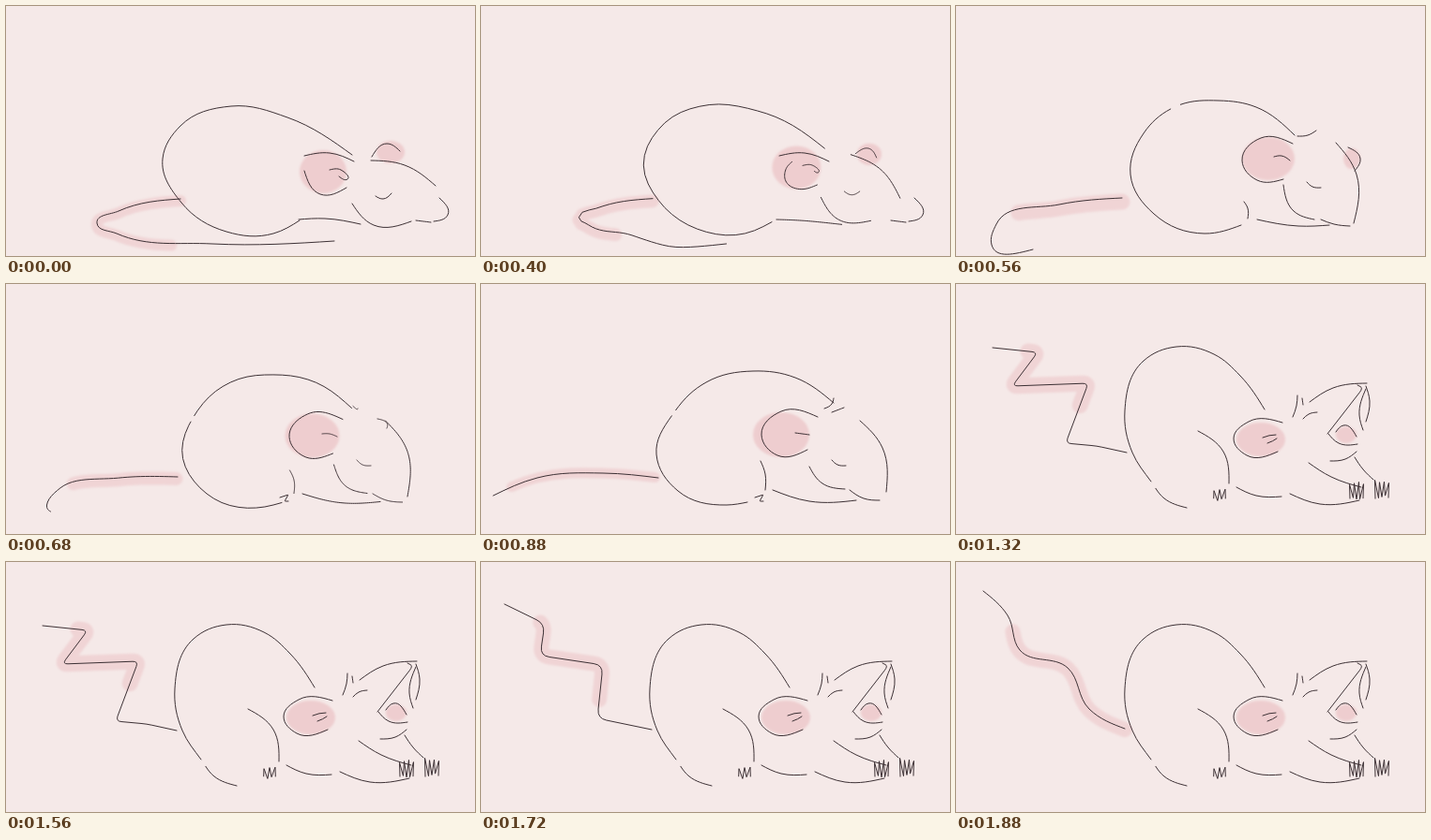
Write an HTML page that moves like this. It is 500 px wide and 267 px high and loops after 2.08 s.

```html
<!DOCTYPE html>
<html lang="en">
<head>
<meta charset="utf-8">
<title>Stretching rat</title>
<style>
  html, body { margin: 0; width: 100%; height: 100%; overflow: hidden; background: #f5e9e8; }
  svg { display: block; width: 100vw; height: 100vh; }
  .pose { visibility: hidden; }
  .pose.on { visibility: visible; }
  path { fill: none; stroke-linecap: round; stroke-linejoin: round; }
  .line { stroke: #3c3034; stroke-width: 1; }
  .tint { stroke: #f0d4d5; }
  .wash { fill: #eecdcf; }
  .soft { filter: url(#soft); }
</style>
</head>
<body>
<svg id="stage" viewBox="0 0 500 267" preserveAspectRatio="none">
  <filter id="soft" filterUnits="userSpaceOnUse" x="-20" y="-20" width="540" height="310">
    <feGaussianBlur stdDeviation="1"/>
  </filter>
</svg>
<script>
const LOOP = 2080;
const NS = 'http://www.w3.org/2000/svg';
const stage = document.getElementById('stage');

const mix = (a, b, t) => a + (b - a) * t;
const mixAll = (a, b, t) => a.map((v, i) => mix(v, b[i], t));
const dist = (a, b) => Math.hypot(b[0] - a[0], b[1] - a[1]);
const toward = (a, b, d) => mixAll(a, b, Math.min(0.5, d / dist(a, b)));

// Direction of the circle through three points, at the middle one.
function heading(a, b, c) {
  const u = dist(a, b) ** 2, v = dist(b, c) ** 2;
  const d = b.map((m, k) => (m - a[k]) / u + (c[k] - m) / v);
  const n = Math.hypot(...d);
  return d.map(x => x / n);
}

function smooth(p) {
  const dir = p.map((b, i) => i && p[i + 1] ? heading(p[i - 1], b, p[i + 1]) : null);
  let d = 'M' + p[0];
  for (let i = 0; i < p.length - 1; i++) {
    const b = p[i], c = p[i + 1], h = dist(b, c) * 0.36;
    const out = dir[i] && b.map((v, k) => v + dir[i][k] * h);
    const back = dir[i + 1] && c.map((v, k) => v - dir[i + 1][k] * h);
    const c1 = out || mixAll(b, back || c, 0.5);
    const c2 = back || mixAll(c, c1, 0.5);
    d += `C${c1} ${c2} ${c}`;
  }
  return d;
}

function bent(p, radius) {
  let d = 'M' + p[0];
  for (let i = 1; i < p.length - 1; i++)
    d += `L${toward(p[i], p[i - 1], radius)}Q${p[i]} ${toward(p[i], p[i + 1], radius)}`;
  return d + 'L' + p.at(-1);
}

const points = text => text.split(' ').map(s => s.split(',').map(Number));
const curve = text => smooth(points(text));
const zigzag = (text, radius = 6) => bent(points(text), radius);

const noise = n => Math.abs(Math.sin(n * 127.1) * 43758.5) % 1;

// A scribbled paw: a fan of pointed toes along a baseline.
function claws(x, y, width, height, toes, seed) {
  const p = [];
  for (let i = 0; i <= toes * 2; i++) {
    const side = i / toes - 1;
    const lift = i % 2 ? height * (0.7 + 0.3 * noise(seed + i)) : 4 * noise(seed + i);
    p.push([x + side * width * (i % 2 ? 0.5 : 0.35), y - lift]);
  }
  return bent(p, 0.5);
}

// Two short parallel folds inside the ear.
const folds = (x, y) => `M${x},${y}q7,-3 14,-3m-9,9q6,-2 10,-5`;

// Lines go through a few key points. Gap is [start, length] along the back, in percent.
// Tint follows the tail: start, end in percent, width, drop. Washes: cx, cy, rx, ry.
const sleep = {
  gap: [100, 0],
  tint: [0, 51, 12, 2],
  wash: { ear: [338, 177, 25, 23], far: [410, 156, 15, 12] },
  lines: {
    tail: curve('186,206 120,219 97,232 118,243 220,254 350,251'),
    back: curve('369,159 300,119 240,107 186,128 167,163 187,210 235,241 285,243 313,229'),
    under: curve('312,228 340,227 378,233'),
    earTop: curve('371,166 345,157 318,160'),
    ear: curve('318,176 335,201 363,194'),
    folds: curve('345,175 357,175 364,185 355,182'),
    far: curve('390,161 406,147 420,155'),
    brow: curve('389,165 425,170 458,192'),
    nose: curve('462,205 471,223 456,230'),
    lip: curve('437,229 453,231'),
    cheek: curve('369,211 392,234 432,230'),
    eye: curve('394,203 402,206 411,200')
  }
};

const wake = {
  gap: [35, 3],
  tint: [0, 52, 17, 4],
  wash: { ear: [333, 163, 28, 23], far: [422, 163, 9, 11] },
  lines: {
    tail: curve('177,205 110,212 43,233 38,255 82,260'),
    back: curve('361,138 320,108 280,101 235,107 200,136 186,180 211,222 265,243 304,234'),
    thigh: curve('307,209 311,216 311,227'),
    under: curve('321,228 365,235 398,234'),
    ear: curve('359,147 325,141 305,165 321,186 349,185'),
    folds: curve('339,161 347,160 356,165'),
    nape: curve('364,139 375,138 384,133'),
    far: curve('418,151 431,163 425,176'),
    brow: curve('405,146 427,180 424,232'),
    cheek: curve('349,191 360,219 382,228'),
    chin: curve('389,228 403,233 420,235'),
    eye: curve('374,188 380,193 389,194')
  }
};

const rise = {
  gap: [52, 2],
  tint: [2, 88, 11, 0],
  wash: { ear: [320, 161, 30, 24] },
  lines: {
    tail: curve('189,207 130,202 60,207 13,226'),
    back: curve('376,127 335,100 290,93 240,105 206,137 187,182 210,221 262,236 284,233'),
    thigh: curve('298,189 303,203 303,220'),
    foot: zigzag('292,228 301,225 297,232 301,232', 1),
    under: curve('311,220 350,232 400,231'),
    ear: curve('359,142 320,136 299,161 316,183 348,177'),
    folds: curve('335,159 350,161'),
    nape: curve('376,122 374,128 366,133'),
    far: curve('374,137 387,132'),
    brow: curve('404,146 428,175 432,222'),
    cheek: curve('350,195 364,213 388,219'),
    chin: curve('393,220 408,229 425,231'),
    eye: wake.lines.eye
  }
};

const reach = {
  gap: [100, 0],
  tint: [4, 90, 13, -1],
  wash: { ear: [320, 168, 31, 22] },
  lines: {
    tail: curve('191,198 130,189 65,176 30,152 0,134'),
    back: curve('325,123 290,99 240,78 200,95 183,140 195,197 218,221 255,234 294,218'),
    thigh: curve('270,160 288,184 294,215'),
    foot: zigzag('278,230 291,225 286,230 290,230', 1),
    under: curve('295,216 325,226 365,229'),
    chin: curve('362,228 390,234 440,232'),
    arm: curve('396,202 416,215 440,233'),
    arm2: zigzag('430,199 455,228 460,228 435,228', 1),
    ear: curve('344,143 310,144 295,168 318,187 350,175'),
    folds: folds(327, 164),
    far: zigzag('352,138 364,119 368,124', 1),
    brow: curve('379,128 402,114 432,109'),
    mouth: zigzag('431,122 418,140 431,141 434,124', 2),
    lip: curve('438,118 439,135 438,152'),
    jaw: curve('437,163 434,176 422,187'),
    cheek: curve('355,182 363,194 379,197'),
    eye: curve('368,147 376,144 386,146')
  }
};

const yawn = {
  gap: [86, 2.5],
  tint: [36, 87, 17, 0],
  wash: { ear: [325, 166, 26, 18], tongue: [416, 161, 11, 9] },
  lines: {
    ...reach.lines,
    tail: zigzag('182,180 150,173 117,170 141,106 60,109 87,73 39,68'),
    back: curve('329,134 303,98 275,75 235,67 200,82 180,135 188,180 208,211 222,229 246,239'),
    thigh: curve('258,157 285,179 291,213'),
    foot: claws(281, 232, 18, 15, 3, 2),
    under: curve('299,217 320,226 347,227'),
    chin: curve('356,224 388,235 430,231'),
    arm: curve('376,191 400,206 432,217'),
    arm2: curve('425,185 434,198 445,209'),
    ear: curve('348,148 312,147 296,165 310,183 343,179'),
    far: curve('364,119 363,130 359,142'),
    far2: curve('369,122 370,129'),
    brow: curve('377,126 402,111 438,106'),
    snout: zigzag('428,108 434,111 396,160'),
    mouth: curve('397,160 408,170 428,171'),
    tongue: curve('405,158 413,151 427,163'),
    lip: curve('437,109 441,125 437,147'),
    teeth: curve('437,112 430,140 434,156'),
    jaw: curve('427,179 415,187 399,189'),
    cheek: '',
    paw: claws(427, 231, 20, 20, 4, 5),
    paw2: claws(454, 230, 20, 21, 4, 9),
    eye: curve('370,144 376,139 385,137')
  }
};

const withTail = (tail, tint) => ({ ...yawn, tint, lines: { ...yawn.lines, tail } });
const flick = withTail(zigzag('182,179 124,167 130,110 63,100 68,66 25,45', 10), [30, 83, 16, 0]);
const relax = withTail(curve('180,178 142,157 119,113 68,94 55,57 29,31'), [0, 76, 16, 1]);

function add(parent, tag, attrs) {
  const el = document.createElementNS(NS, tag);
  for (const k in attrs) el.setAttribute(k, attrs[k]);
  return parent ? parent.appendChild(el) : el;
}

function blendPath(a, b, t) {
  const steps = 40;
  const ends = [a, b].map(d => add(null, 'path', { d }));
  const sizes = ends.map(e => e.getTotalLength());
  const p = [];
  for (let i = 0; i <= steps; i++) {
    const [u, v] = ends.map((e, k) => e.getPointAtLength(sizes[k] * i / steps));
    p.push([mix(u.x, v.x, t), mix(u.y, v.y, t)]);
  }
  return 'M' + p.join('L');
}

// Parts present in one pose only come from the nearer pose.
function blendParts(a, b, t, join) {
  const out = {};
  for (const k in { ...a, ...b }) {
    const near = t < 0.5 ? a[k] : b[k];
    if (a[k] && b[k]) out[k] = join(a[k], b[k], t);
    else if (near) out[k] = near;
  }
  return out;
}

const between = (a, b, t) => ({
  gap: t < 0.5 ? a.gap : b.gap,
  tint: mixAll(a.tint, b.tint, t),
  wash: blendParts(a.wash, b.wash, t, mixAll),
  lines: blendParts(a.lines, b.lines, t, blendPath)
});

function draw({ gap, tint, wash, lines }) {
  const g = add(stage, 'g', { class: 'pose' });
  const soft = add(g, 'g', { class: 'soft' });
  const [from, to, width, drop] = tint;
  add(soft, 'path', {
    class: 'tint', d: lines.tail, pathLength: 100, 'stroke-width': width,
    'stroke-dasharray': `${to - from} 1000`, 'stroke-dashoffset': -from,
    transform: `translate(0 ${drop})`
  });
  for (const [cx, cy, rx, ry] of Object.values(wash))
    add(soft, 'ellipse', { class: 'wash', cx, cy, rx, ry });
  for (const name in lines) {
    const el = add(g, 'path', { class: 'line', d: lines[name] });
    if (name === 'back' && gap[1]) {
      el.setAttribute('pathLength', 100);
      el.setAttribute('stroke-dasharray', `${gap.join(' ')} 100 0`);
    }
  }
  return g;
}

const timeline = [
  [0, sleep],
  [400, between(sleep, wake, 0.33)],
  [480, between(sleep, wake, 0.67)],
  [560, wake],
  [680, between(wake, rise, 0.5)],
  [880, rise],
  [960, between(rise, reach, 0.5)],
  [1080, reach],
  [1200, between(reach, yawn, 0.5)],
  [1320, yawn],
  [1440, flick],
  [1560, yawn],
  [1720, flick],
  [1880, relax]
].map(([start, pose]) => ({ start, group: draw(pose) }));

const begin = performance.now();
let shown;

function tick() {
  const t = (performance.now() - begin) % LOOP;
  const now = timeline.findLast(s => s.start <= t).group;
  if (now !== shown) {
    if (shown) shown.classList.remove('on');
    now.classList.add('on');
    shown = now;
  }
  requestAnimationFrame(tick);
}
tick();
</script>
</body>
</html>
```
